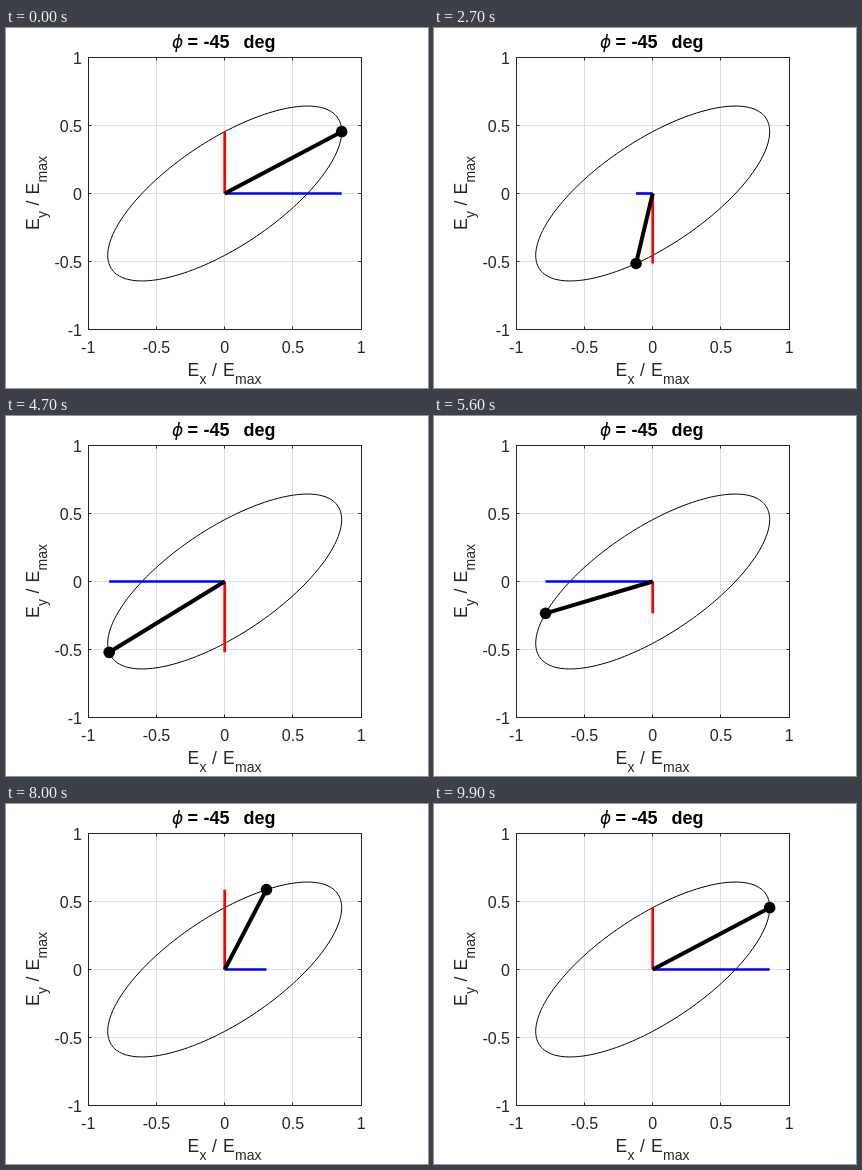
Recreate the animation shown at these times as an HTML page. Size 422 by 360 pixels, loop 10000 ms.

```html
<!DOCTYPE html>
<html lang="en">
<head>
<meta charset="utf-8">
<title>Polarization ellipse</title>
<style>
  html, body { margin: 0; width: 100%; height: 100%; overflow: hidden; background: #fff; }
  svg { display: block; width: 422px; height: 360px; }
  text { font-family: "Liberation Sans", Arial, sans-serif; fill: #262626; white-space: pre; }
  .tick { font-size: 16px; }
  .label { font-size: 17.6px; }
  .sub { font-size: 14px; }
  .title { font-size: 18px; font-weight: bold; fill: #000; }
  .phi { font: italic 17px "DejaVu Sans", sans-serif; fill: #000; }
  line, path, rect { fill: none; }
</style>
</head>
<body>
<svg id="stage" viewBox="0 0 422 360"></svg>
<script>
const svg = document.getElementById("stage");
const CX = 218.7, CY = 165.5, SX = 136.5, SY = 136;
const LEFT = 82.5, RIGHT = 355.5, TOP = 29.5, BOTTOM = 301.5;
const AMP_X = 0.857, AMP_Y = 0.643, PHASE = -Math.PI / 4;
const STEP_MS = 100, STEPS = 100;

function add(tag, attrs, text = "", parent = svg) {
  const node = document.createElementNS("http://www.w3.org/2000/svg", tag);
  set(node, attrs);
  node.textContent = text;
  return parent.appendChild(node);
}
function set(node, attrs) {
  for (const key in attrs) node.setAttribute(key, attrs[key]);
}
function line(x1, y1, x2, y2, stroke, width = 1) {
  return add("line", { x1, y1, x2, y2, stroke, "stroke-width": width });
}
const px = x => CX + SX * x;
const py = y => CY - SY * y;
const snap = v => Math.floor(v) + 0.5;
const field = a => [px(AMP_X * Math.cos(a)), py(AMP_Y * Math.cos(a - PHASE))];

// Grid, frame and ticks
for (const v of [-0.5, 0, 0.5]) {
  line(snap(px(v)), TOP, snap(px(v)), BOTTOM, "#dfdfdf");
  line(LEFT, snap(py(v)), RIGHT, snap(py(v)), "#dfdfdf");
}
add("rect", { x: LEFT, y: TOP, width: RIGHT - LEFT, height: BOTTOM - TOP, stroke: "#262626" });
for (const v of [-1, -0.5, 0, 0.5, 1]) {
  const x = snap(px(v)), y = snap(py(v));
  if (Math.abs(v) < 1) {
    line(x, TOP, x, TOP + 3, "#262626");
    line(x, BOTTOM, x, BOTTOM - 3, "#262626");
    line(LEFT, y, LEFT + 3, y, "#262626");
    line(RIGHT, y, RIGHT - 3, y, "#262626");
  }
  add("text", { x: px(v), y: 325, class: "tick", "text-anchor": "middle" }, v);
  add("text", { x: 76, y: py(v) + 6, class: "tick", "text-anchor": "end" }, v);
}

function axisLabel(axis, transform) {
  const g = add("g", { transform });
  const put = (x, y, kind, text) => add("text", { x, y, class: kind }, text, g);
  put(0, 0, "label", "E");
  put(12, 7.5, "sub", axis);
  put(24.5, 0, "label", "/");
  put(35.5, 0, "label", "E");
  put(47.5, 7.5, "sub", "max");
}
axisLabel("x", "translate(181.5 348)");
axisLabel("y", "translate(33 202) rotate(-90)");

add("text", { x: 166, y: 20, class: "phi" }, "\u03d5");
add("text", { x: 181.5, y: 20, class: "title" }, "=");
add("text", { x: 197.5, y: 20, class: "title" }, "-45");
add("text", { x: 237.5, y: 20, class: "title" }, "deg");

const outline = Array.from({ length: 181 }, (_, i) =>
  field(i * Math.PI / 90).map(v => v.toFixed(2)).join(" "));
add("path", { d: "M" + outline.join("L") + "Z", stroke: "#000" });

const xPart = line(CX, CY, CX, CY, "#00f", 2.7);
const yPart = line(CX, CY, CX, CY, "#f00", 2.7);
const total = line(CX, CY, CX, CY, "#000", 4);
const dot = add("circle", { r: 5.8, fill: "#000" });

function draw(ms) {
  const step = Math.floor(ms / STEP_MS) % STEPS;
  const [x, y] = field(2 * Math.PI * step / (STEPS - 1));
  set(xPart, { x2: x });
  set(yPart, { y2: y });
  set(total, { x2: x, y2: y });
  set(dot, { cx: x, cy: y });
}

let start;
function tick(now) {
  start ??= now;
  draw(now - start);
  requestAnimationFrame(tick);
}
draw(0);
requestAnimationFrame(tick);
</script>
</body>
</html>
```
